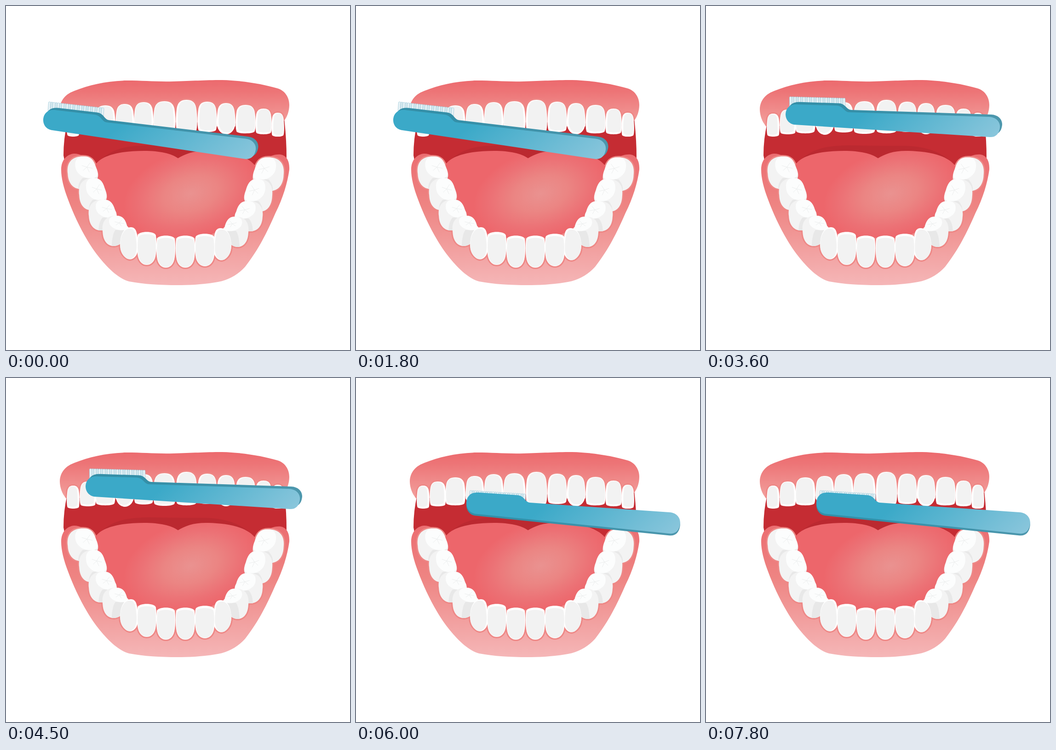
Animation of 748 by 748 pixels, one loop 8.1 s. Source, as an HTML page:

```html
<!DOCTYPE html>
<html lang="en">
<head>
<meta charset="utf-8">
<title>Brushing teeth</title>
<style>
html, body { margin: 0; width: 100%; height: 100%; overflow: hidden; background: #fff; }
svg { display: block; width: 100vw; height: 100vh; }
</style>
</head>
<body>
<svg viewBox="0 0 748 748">
  <defs>
    <linearGradient id="upperFill" gradientUnits="userSpaceOnUse" x1="0" y1="162" x2="0" y2="262">
      <stop offset="0" stop-color="#ec6a6e"/><stop offset=".25" stop-color="#ed7577"/><stop offset="1" stop-color="#f2a19e"/>
    </linearGradient>
    <linearGradient id="lowerFill" gradientUnits="userSpaceOnUse" x1="0" y1="322" x2="0" y2="606">
      <stop offset="0" stop-color="#eb6d71"/><stop offset=".4" stop-color="#ee8583"/><stop offset="1" stop-color="#f5b6b7"/>
    </linearGradient>
    <radialGradient id="tongueFill" gradientUnits="userSpaceOnUse" cx="0" cy="0" r="1" gradientTransform="translate(402 408) rotate(-16) scale(150 95)">
      <stop offset="0" stop-color="#ea9290"/><stop offset=".4" stop-color="#eb8583"/><stop offset=".75" stop-color="#ec7175"/><stop offset="1" stop-color="#ed666b"/>
    </radialGradient>
    <linearGradient id="handleFill" gradientUnits="userSpaceOnUse" x1="430" y1="215" x2="600" y2="400">
      <stop offset="0" stop-color="#3ba9c8"/><stop offset="1" stop-color="#8fc8dd"/>
    </linearGradient>
    <linearGradient id="edgeFill" gradientUnits="userSpaceOnUse" x1="380" y1="0" x2="712" y2="0">
      <stop offset="0" stop-color="#348fa8"/><stop offset="1" stop-color="#4d97ad"/>
    </linearGradient>
    <path id="upperGum" d="M131 262C122 252 117 238 117 224C118 204 130 191 150 184C180 172 218 163 262 162C300 162 325 165 365 164C405 163 430 161 470 161C515 162 560 170 590 179C607 184 616 199 616 215C616 229 611 242 605 249L590 258Q370 246 131 262Z"/>
    <clipPath id="gumClip"><use href="#upperGum"/></clipPath>
    <path id="handle" d="M268 210L352 214C367 215 368 228 379 229L683 244C700 245 709 257 706 270C704 282 696 289 684 288L260 254C248 252 241 243 241 231C242 217 251 209 268 210Z"/>
  </defs>

  <path fill="#c52c33" d="M133 255Q125 288 125 325L140 400H595L610 330Q610 288 605 246Z"/>
  <path fill="#bb2930" d="M205 335C235 308 265 304 310 303Q370 304 420 304C465 303 505 312 532 338Z"/>
  <path fill="url(#lowerFill)" d="M120 356C120 333 134 322 148 321C162 321 172 328 178 338L240 480L373 520L500 480L560 338C570 326 585 322 597 323C610 325 617 337 616 356C612 385 602 418 586 450C567 494 548 531 520 567C501 588 478 598 455 601C425 606 395 607 373 607C335 607 300 605 268 599C242 592 216 565 193 534C168 499 148 456 135 421C125 395 120 374 120 356Z"/>
  <g id="lowerHalo" fill="#ee8886" stroke="#ee8886" stroke-width="6"></g>
  <path fill="url(#tongueFill)" d="M194 346C208 323 254 315 300 315C335 315 360 321 374 331C390 321 410 314 440 315C480 316 525 323 543 349L520 430L480 482L430 504H310L250 482L210 430Z"/>
  <g id="lowerTeeth"></g>
  <use href="#upperGum" fill="url(#upperFill)"/>
  <g id="upperHalo" fill="#ee8785" stroke="#ee8785" stroke-width="6" clip-path="url(#gumClip)"></g>
  <g id="upperTeeth"></g>
  <g id="brush">
    <g id="bristles"></g>
    <use id="edge" href="#handle" fill="url(#edgeFill)"/>
    <use href="#handle" fill="url(#handleFill)"/>
  </g>
</svg>
<script>
const $ = id => document.getElementById(id);

function add(parent, d, attrs = {}) {
  const el = document.createElementNS('http://www.w3.org/2000/svg', 'path');
  el.setAttribute('d', d);
  for (const k in attrs) el.setAttribute(k, attrs[k]);
  parent.appendChild(el);
}

// Places a path drawn in a unit square into a box.
function fit(unit, [x0, y0, x1, y1], flip) {
  return unit.replace(/(-?[\d.]+) (-?[\d.]+)/g, (_, u, v) => {
    const x = flip ? 1 - u : +u;
    return (x0 + x * (x1 - x0)).toFixed(1) + ' ' + (y0 + v * (y1 - y0)).toFixed(1);
  });
}

const SIDE = 'C-.02 .8 0 .45 .06 .22 C.12 .05 .28 0 .5 0 C.72 0 .88 .05 .94 .22 C1 .45 1.02 .8 ';
const FLAT = 'M.06 .94' + SIDE + '.94 .94 C.85 1.02 .15 1.02 .06 .94Z';
const POINTED = 'M.04 .75' + SIDE + '.96 .75 C.9 .9 .72 1 .5 1 C.28 1 .1 .9 .04 .75Z';
const FRONT = 'M.03 .1 C.1 -.03 .9 -.03 .97 .1 C1.02 .3 1.02 .55 .95 .75 C.88 .92 .7 1 .5 1 C.3 1 .12 .92 .05 .75 C-.02 .55 -.02 .3 .03 .1Z';
const CANINE = 'M.0 .55 C0 .3 .15 .05 .45 .01 C.75 -.03 .88 .05 .93 .25 C1 .5 1.02 .7 .9 .85 C.75 1 .55 1.02 .4 .98 C.15 .9 0 .75 0 .55Z';

// left, top, right, bottom
const upper = [
  [132, 234, 160, 284], [160, 225, 196, 279], [194, 216, 238, 277], [238, 213, 279, 280],
  [278, 209, 321, 275], [320, 207, 369, 278], [369, 204, 416, 277], [416, 208, 459, 274],
  [458, 211, 499, 279], [499, 215, 543, 277], [542, 223, 578, 279], [577, 232, 605, 284]
];
upper.forEach((b, i) => {
  const shape = i === 3 || i === 8 ? POINTED : FLAT;
  const right = i > 5;
  const [x0, y0, x1, y1] = b;
  const inner = [x0 + (right ? 4 : 1.5), y0 + 1.5, x1 - (right ? 1.5 : 4), y1 - 4];
  add($('upperHalo'), fit(shape, b));
  add($('upperTeeth'), fit(shape, b), { fill: '#fff' });
  add($('upperTeeth'), fit(shape, inner), { fill: '#f2f2f2' });
});

// Molar: silhouette, shaded inner face, chewing surface whose depth is k.
function molar(b, k, flip) {
  const body = 'M.02 .54 C-.03 .2 .14 .02 .46 0 C.78 -.02 .88 .15 .94 .34 C1.03 .54 1.02 .64 .95 .72 C.84 .83 .66 .98 .46 1 C.18 1.01 .03 .8 .02 .54Z';
  const shade = `M.5 ${k} C.4 ${k + .1} .36 .85 .36 1 L.48 1 C.66 .98 .84 .83 .95 .72 L.96 ${k - .03}Z`;
  const crown = `M.26 ${k * .37} C.26 .07 .38 0 .52 0 C.8 -.01 .87 .15 .93 .34 C1.03 ${k * .8} 1 ${k} .86 ${k} C.7 ${k + .02} .52 ${k} .4 ${k * .83} C.3 ${k * .72} .26 ${k * .55} .26 ${k * .37}Z`;
  const m = k / 2;
  const cracks = `M.48 ${m * .85} L.64 ${m} L.74 ${m * .6} M.64 ${m} L.82 ${m * 1.1} M.64 ${m} L.52 ${m * 1.3} M.64 ${m} L.72 ${m * 1.45}`;
  const g = $('lowerTeeth');
  add($('lowerHalo'), fit(body, b, flip));
  add(g, fit(body, b, flip), { fill: '#f3f3f3' });
  add(g, fit(shade, b, flip), { fill: '#e8e8e8' });
  add(g, fit(crown, b, flip), { fill: '#fcfdfd' });
  add(g, fit(cracks, b, flip), { fill: 'none', stroke: '#eceeee', 'stroke-width': 1, 'stroke-linecap': 'round' });
}
molar([133, 327, 200, 398], .66);
molar([158, 374, 219, 444], .68);
molar([179, 421, 241, 488], .58);
molar([209, 456, 267, 522], .47);
molar([537, 329, 605, 402], .66, true);
molar([518, 376, 580, 447], .68, true);
molar([497, 424, 559, 490], .58, true);
molar([472, 458, 528, 524], .47, true);

function front(shape, b, flip, inner) {
  add($('lowerHalo'), fit(shape, b, flip));
  add($('lowerTeeth'), fit(shape, b, flip), { fill: '#fff' });
  add($('lowerTeeth'), fit(shape, inner, flip), { fill: '#f2f2f2' });
}
front(CANINE, [248, 481, 288, 551], false, [248.5, 484, 284.5, 550.5]);
front(CANINE, [450, 483, 490, 553], true, [453.5, 486, 489.5, 552.5]);
[[285, 491, 327, 563], [327, 499, 368, 569], [369, 499, 411, 569], [411, 495, 454, 566]].forEach(b => {
  const [x0, y0, x1, y1] = b;
  front(FRONT, b, false, [x0 + 1.5, y0 + 5, x1 - 1.5, y1 - 1]);
});

const TUFTS = 25;
for (let i = 0; i < TUFTS; i++) {
  const x = 250 + i * 4.84, y = 193 + i * .21;
  add($('bristles'), `M${x} ${y + 23}V${y + 2}q0 -2 2 -2h1q2 0 2 2v21z`,
    { fill: i % 2 ? '#d3e8ef' : '#e6f2f6', stroke: '#a4cddb', 'stroke-width': .8 });
}

const STEP = 300, LOOP = 8100;
// Brush head x, y and tilt: raised, halfway, lowered, for each stretch of teeth.
const strokes = [
  [[102, 246, 3.9], [104, 263, 2.4], [110, 280, 1]],
  [[194, 234, -.95], [194, 252, 0], [193, 270, 1]],
  [[262, 230, 0], [262, 250, .5], [261, 270, 1]]
];

function draw(ms) {
  const step = Math.floor((ms % LOOP) / STEP);
  const roll = (step % 3) / 2;
  const [x, y, tilt] = strokes[Math.floor(step / 9)][step % 3];
  $('brush').setAttribute('transform',
    `translate(${x} ${y}) rotate(${tilt}) scale(1 ${1 + .05 * roll}) translate(-262 -230)`);
  $('edge').setAttribute('transform', `translate(${5 - 5 * roll} ${-5 + 9 * roll})`);
  $('bristles').setAttribute('transform', `translate(${-2 * roll} ${13 * roll})`);
}

const start = performance.now();
function tick() {
  draw(performance.now() - start);
  requestAnimationFrame(tick);
}
tick();
</script>
</body>
</html>
```
